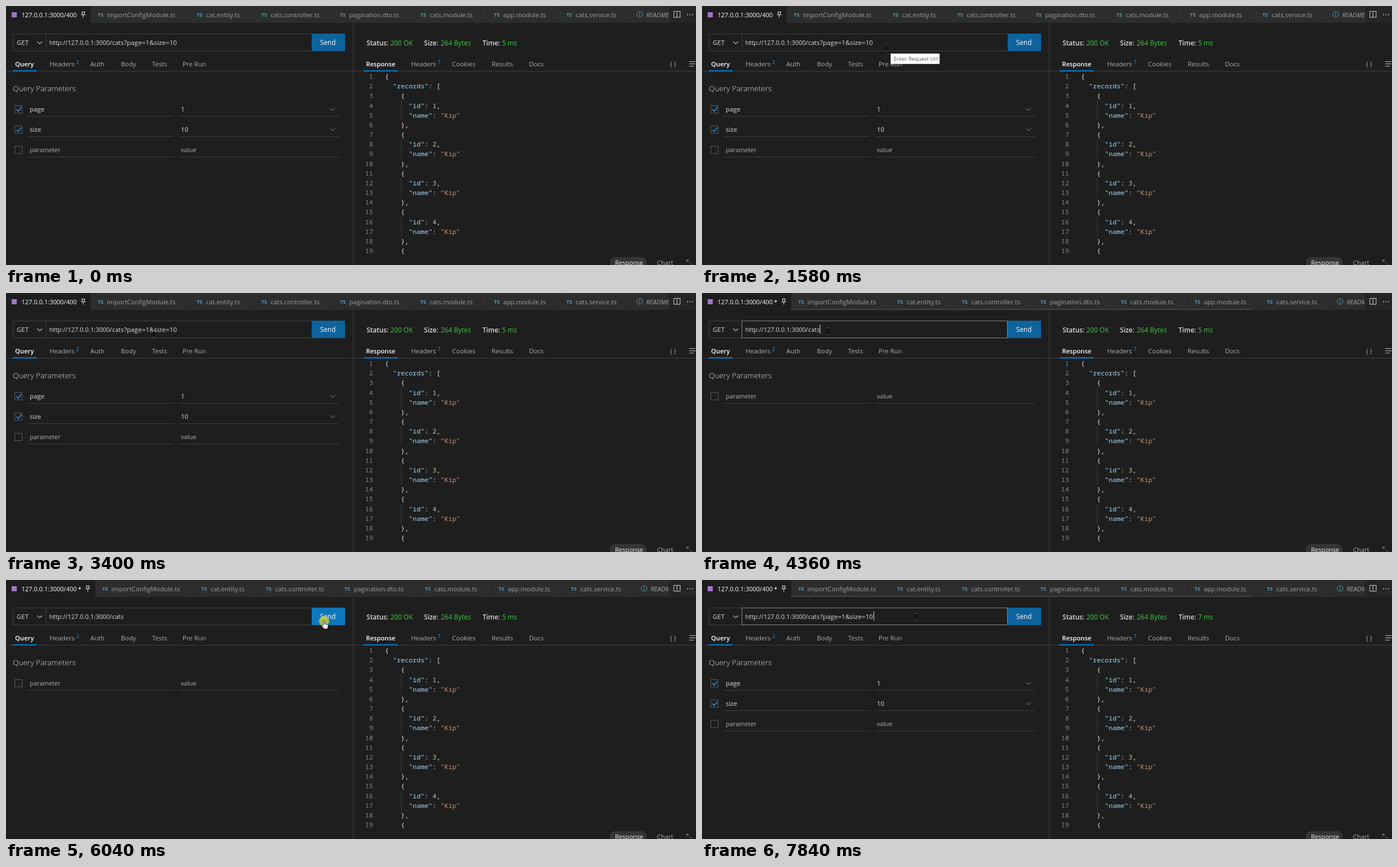
Write an HTML page that moves like this. It is 1219 px wide and 459 px high and loops after 8000 ms.

```html
<!DOCTYPE html>
<html lang="en">
<head>
<meta charset="utf-8">
<style>
  html, body { margin: 0; width: 100%; height: 100%; overflow: hidden; background: #1e1e1e; }
  svg { display: block; font-family: "Open Sans", "Noto Sans", sans-serif; }
  text { white-space: pre; }
  .code { font-family: "Noto Sans Mono", "DejaVu Sans Mono", monospace; font-size: 11.67px; font-weight: 500; }
</style>
</head>
<body>
<svg id="stage" width="1219" height="459" viewBox="0 0 1219 459"></svg>
<script>
const LOOP = 8000;
const GREEN = '#3ecb3e', BLUE = '#007fd4', LINE = '#404040', DIM = '#adadad', LIGHT = '#dcdcdc';

const text = (x, y, s, fill = LIGHT, size = 11.2, extra = '') =>
  `<text x="${x}" y="${y}" fill="${fill}" font-size="${size}" ${extra}>${s}</text>`;
const rect = (x, y, w, h, fill, extra = '') =>
  `<rect x="${x}" y="${y}" width="${w}" height="${h}" fill="${fill}" ${extra}/>`;
const path = (d, stroke, width = 1, extra = '') =>
  `<path d="${d}" fill="none" stroke="${stroke}" stroke-width="${width}" ${extra}/>`;
const group = (id, body) => `<g id="${id}">${body}</g>`;
const bold = 'font-weight="600"';

function tabBar() {
  const files = [
    [150, 'importConfigModule.ts'], [325, 'cat.entity.ts'], [439, 'cats.controller.ts'],
    [578, 'pagination.dto.ts'], [720, 'cats.module.ts'], [850, 'app.module.ts'], [978, 'cats.service.ts']];
  const others = files.map(([x, name]) =>
    rect(x - 1, 0, 1, 30, '#252526') +
    text(x + 12, 18.5, 'TS', '#519aba', 9, 'font-weight="700"') +
    text(x + 28.5, 20, name, '#a0a0a0')).join('');
  const readme = rect(1101, 0, 1, 30, '#252526') +
    '<circle cx="1119.5" cy="15" r="5" fill="none" stroke="#519aba"/>' +
    path('M1119.5 14v4M1119.5 12v1', '#519aba') +
    text(1131, 20, 'README.md', '#a0a0a0', 11.2, 'font-style="italic"');
  return rect(0, 0, 1219, 30, '#2d2d2d') +
    group('files', others + readme) +
    group('scroll', rect(150, 28, 822, 2, '#797979', 'opacity=".3"')) +
    rect(0, 0, 149, 31, '#1e1e1e', 'id="activeTab"') +
    rect(10, 11, 9, 9, '#a074c4') +
    text(27.5, 20, '127.0.0.1:3000/400', '#fff', 11) +
    group('star', text(127, 20, '*', '#fff')) +
    group('pin', path('M133.5 10.5h6M134.5 10.5v5M138.5 10.5v5M132.5 15.5h8M136.5 15.5v5', '#e0e0e0', 1.1)) +
    rect(1171, 0, 48, 30, '#252526') +
    path('M1180 9.5h11v10.5h-11zM1185.5 9.5v10.5', '#c5c5c5', 1.1) +
    [1204, 1208.5, 1213].map(x => `<circle cx="${x}" cy="15.5" r="1" fill="#c5c5c5"/>`).join('');
}

function paramRow(y, name, value, checked) {
  const color = checked ? LIGHT : '#b0b0b0', size = checked ? 11.4 : 11;
  return rect(15.5, y - 6.5, 13, 13, '#1e1e1e', 'stroke="#5a5a5a"') +
    (checked ? path(`M18.5 ${y}l3 3.5 5.5 -7`, '#2196f3', 1.7) +
      path(`M572.5 ${y - 2}l4.5 4 4.5 -4`, '#909090') : '') +
    text(42, y + 4, name, color, size) + text(309, y + 4, value, color, size) +
    rect(38, y + 12, 258, 1, LINE) + rect(305, y + 12, 283, 1, LINE);
}

function requestPane() {
  const tabs = [[77, 'Headers'], [149, 'Auth'], [203, 'Body'], [258, 'Tests'], [312, 'Pre Run']];
  const search = '<tspan id="search" x="208.5" font-size="11.6">?page=1&amp;size=10</tspan>';
  return rect(12.5, 49.5, 528, 30, 'none', `stroke="${LINE}"`) +
    rect(70, 49, 1, 31, LINE) +
    text(19, 69, 'GET', LIGHT, 11.4) +
    path('M55 63l4.5 4 4.5 -4', '#c0c0c0', 1.1) +
    text(76.5, 69, 'http://127.0.0.1:3000/cats' + search, LIGHT, 11) +
    rect(70.5, 49.5, 469, 30, 'none', 'id="focus" stroke="#858585"') +
    rect(208, 56, 1, 16, '#e0e0e0', 'id="caret"') +
    rect(540, 49, 59, 31, '#0e639c', 'id="send"') +
    text(555, 69, 'Send', '#fff', 11.7, 'font-weight="500"') +
    text(16, 107, 'Query', '#fff', 11.2, bold) +
    tabs.map(([x, s]) => text(x, 107, s, DIM, 11.3)).join('') +
    text(124, 103, '2', '#2196f3', 9) +
    rect(0, 115, 613, 1, LINE) + rect(12, 114, 42, 2, BLUE) +
    text(12, 151, 'Query Parameters', LIGHT, 13.6, 'font-weight="300"') +
    group('filled', paramRow(183, 'page', '1', true) + paramRow(219, 'size', '10', true) + paramRow(255, 'parameter', 'value')) +
    group('empty', paramRow(183, 'parameter', 'value'));
}

function codeLines() {
  const key = s => `<tspan fill="#9cdcfe">"${s}"</tspan>: `;
  const rows = ['{', '  ' + key('records') + '['];
  for (let id = 1; id <= 5; id++) {
    rows.push('    {',
      `      ${key('id')}<tspan fill="#b5cea8">${id}</tspan>,`,
      `      ${key('name')}<tspan fill="#ce9178">"Kip"</tspan>`,
      '    },');
  }
  return rows.slice(0, 19).map((row, i) => {
    const y = 129 + i * 17.17;
    const guide = row.startsWith('      ') ? rect(698, y - 12.5, 1, 17.17, '#404040') : '';
    return guide + `<text class="code" x="648.5" y="${y}" fill="#858585" text-anchor="end">${i + 1}</text>` +
      `<text class="code" x="669.5" y="${y}" fill="#e4e4e4">${row}</text>`;
  }).join('');
}

function responsePane() {
  const stats = [[637, 'Status:', 679, '200 OK'], [738.5, 'Size:', 768, '264 Bytes'], [842, 'Time:', 876.5, '<tspan id="time">5</tspan> ms']];
  const tabs = [[715.5, 'Headers'], [788, 'Cookies'], [858, 'Results'], [924, 'Docs']];
  return rect(613, 31, 1, 428, '#444') +
    stats.map(([x, label, vx, value]) =>
      text(x, 70, label, LIGHT, 11.7, bold) + text(vx, 70, value, GREEN, 11.8, 'font-weight="500"')).join('') +
    text(636, 107, 'Response', '#fff', 11.2, bold) +
    tabs.map(([x, s]) => text(x, 107, s, DIM, 11.3)).join('') +
    text(762.5, 103, '7', '#2196f3', 9) +
    text(1173, 107, '{ }', '#b0b0b0', 11) +
    path('M1207 98.5h11M1207 102.5h11M1207 106.5h8', '#c5c5c5', 1.2) +
    rect(614, 115, 605, 1, LINE) + rect(632, 114, 60, 2, BLUE) +
    codeLines() +
    rect(1067, 445, 65, 24, '#353535', 'rx="9"') +
    text(1076, 459, 'Response', '#eee', 11) + text(1150, 459, 'Chart', DIM, 11.2) +
    path('M1202.5 454v-4h4M1202.5 450l4 4M1209 456l4 4', '#909090');
}

const overlays =
  group('tip', rect(333.5, 84.5, 86, 18, '#fff', 'stroke="#b8b8b8"') + text(338.5, 97, 'Enter Request Url', '#555', 9.5)) +
  '<circle id="click" cx="562" cy="73" r="9" fill="#d8d23c" opacity=".75"/>' +
  group('beam', path('M-2 -5.5h4M-2 5.5h4', '#777') + path('M0 -5.5v11', '#000', 1.6)) +
  group('hand', '<path d="M-1 0q1-1 2 0v5l5 1q1.500 .5 1 2.500l-1 5h-6l-4.500-5.500q0-2 2-1l1.500 1z" fill="#fff" stroke="#111" stroke-width=".7"/>');

document.getElementById('stage').innerHTML = tabBar() + requestPane() + responsePane() + overlays;
const el = id => document.getElementById(id);
const show = (id, on) => el(id).setAttribute('visibility', on ? 'visible' : 'hidden');
const move = (id, x, y = 0) => el(id).setAttribute('transform', `translate(${x} ${y})`);

// time, x, y of the pointer
const track = [
  [120, 1204, 404], [920, 325, 78], [1120, 326, 74], [1850, 326, 74], [2370, 484, 73],
  [2560, 484, 73], [3100, 204, 76], [3340, 274, 70], [3400, 261, 73], [3460, 261, 73],
  [4110, 212, 67], [4300, 212, 67], [4900, 551, 79], [5130, 551, 79], [5250, 562, 78],
  [5640, 562, 78], [5650, 562, 73], [6969, 562, 73], [6970, 500, 76], [7050, 500, 76], [7440, 379, 65]];

function pointer(t) {
  const i = track.findIndex(k => k[0] > t);
  if (i < 0) return track[track.length - 1].slice(1);
  if (i === 0) return track[0].slice(1);
  const [t0, x0, y0] = track[i - 1], [t1, x1, y1] = track[i];
  const u = (t - t0) / (t1 - t0), e = u * u * (3 - 2 * u);
  return [x0 + (x1 - x0) * e, y0 + (y1 - y0) * e];
}

function render(t) {
  const within = (a, b) => t >= a && t < b;
  const trimmed = within(4300, 7770);
  const dirty = within(4300, 6260) || t >= 7770;
  const shift = dirty ? 8 : 0;

  move('files', shift);
  move('pin', shift);
  el('activeTab').setAttribute('width', 149 + shift);
  show('star', dirty);
  show('scroll', within(4300, 5080) || within(6260, 7100) || t >= 7770);

  el('search').style.display = trimmed ? 'none' : '';
  show('filled', !trimmed);
  show('empty', trimmed);
  show('focus', within(1910, 2310) || within(4300, 5920) || t >= 7200);
  show('caret', within(4300, 5390) || t >= 7200);
  move('caret', trimmed ? 0 : 95);
  el('send').setAttribute('fill', within(4840, 7050) ? '#1177bb' : '#0e639c');
  el('time').textContent = t >= 6180 ? '7' : '5';

  show('tip', within(1580, 1850));
  show('click', within(5920, 6180));
  const [x, y] = pointer(t), overButton = x >= 540 && t > 4300;
  show('beam', t >= 120 && !overButton);
  show('hand', overButton);
  move('beam', x, y);
  move('hand', x, y);
}

function tick() {
  render(performance.now() % LOOP);
  requestAnimationFrame(tick);
}
tick();
</script>
</body>
</html>
```
